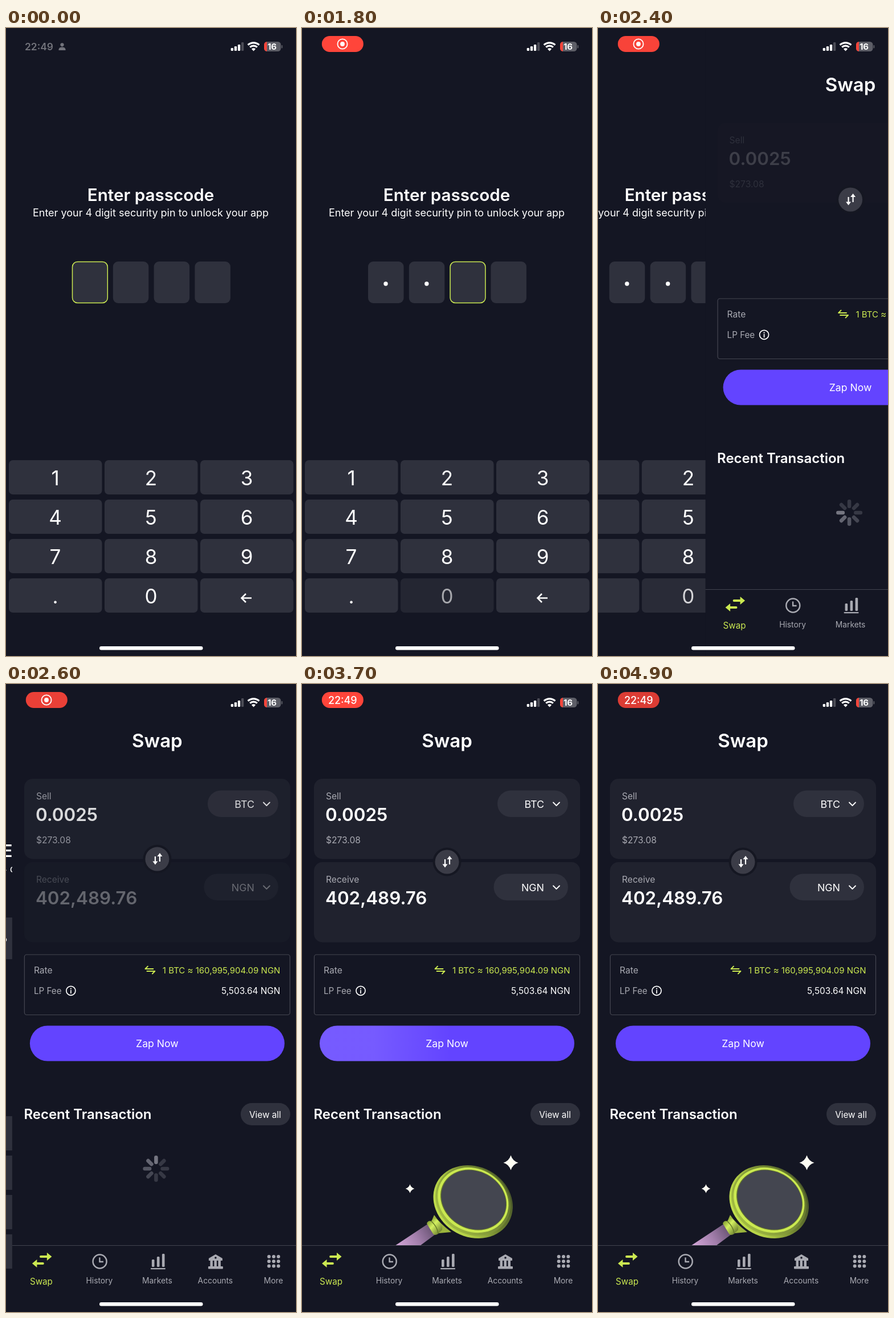
An HTML page with a canvas for the animation above (5000 ms loop, 509 by 1100 pixels).

```html
<!DOCTYPE html>
<html lang="en">
<head>
<meta charset="utf-8">
<title>Passcode to swap</title>
<style>
html, body { margin: 0; width: 509px; height: 1100px; overflow: hidden; background: #141623; }
canvas { display: block; }
</style>
</head>
<body>
<canvas id="stage" width="509" height="1100"></canvas>
<script>
const W = 509, H = 1100, LOOP = 5000, STEP = 100;
const BG = '#141623', KEY = '#2f313d', CARD = '#20222e', LIME = '#cbe951';
const GRAY = '#a9aab2', VIOLET = '#6344ff', WHITE = '#fff', RED = '#ff453a';
const PRESSES = [1200, 1500, 1800, 2200];
const c = document.getElementById('stage').getContext('2d');

const clamp = v => Math.max(0, Math.min(1, v));
const ramp = (t, from, to) => clamp((t - from) / (to - from));

function group(draw, x = 0, y = 0, alpha = 1) {
  c.save();
  c.translate(x, y);
  c.globalAlpha *= alpha;
  draw();
  c.restore();
}

function box(x, y, w, h, r, color) {
  c.beginPath();
  c.roundRect(x, y, w, h, r);
  c.fillStyle = color;
  c.fill();
}

function frame(x, y, w, h, r, color, width) {
  c.beginPath();
  c.roundRect(x, y, w, h, r);
  c.strokeStyle = color;
  c.lineWidth = width;
  c.stroke();
}

function disc(x, y, r, color) {
  c.beginPath();
  c.arc(x, y, r, 0, Math.PI * 2);
  c.fillStyle = color;
  c.fill();
}

function ring(x, y, r, color, width) {
  c.beginPath();
  c.arc(x, y, r, 0, Math.PI * 2);
  c.strokeStyle = color;
  c.lineWidth = width;
  c.stroke();
}

function oval(x, y, rx, ry, color) {
  c.beginPath();
  c.ellipse(x, y, rx, ry, 0.5, 0, Math.PI * 2);
  c.fillStyle = color;
  c.fill();
}

function stroke(path, color, width, cap = 'round') {
  c.strokeStyle = color;
  c.lineWidth = width;
  c.lineCap = cap;
  c.lineJoin = cap === 'butt' ? 'miter' : 'round';
  c.stroke(new Path2D(path));
}

function shape(path, color) {
  c.fillStyle = color;
  c.fill(new Path2D(path));
}

function text(str, x, y, size, color = WHITE, align = 'left', weight = 400) {
  c.font = `${weight} ${size}px Inter, sans-serif`;
  c.textAlign = align;
  c.fillStyle = color;
  c.fillText(str, x, y);
}

function linear(x0, y0, x1, y1, stops) {
  const g = c.createLinearGradient(x0, y0, x1, y1);
  stops.forEach(([at, color]) => g.addColorStop(at, color));
  return g;
}

// ---- Passcode page ----

function keyAlpha(t) {
  const last = PRESSES.filter(p => p <= t).pop();
  if (last === undefined) return 1;
  return [0.6, 0.45, 0.8][(t - last) / STEP] ?? 1;
}

function passcodePage(t) {
  box(0, 0, W, H, 0, BG);
  text('Enter passcode', 254, 303, 29.6, WHITE, 'center', 600);
  text('Enter your 4 digit security pin to unlock your app', 254, 330, 18, WHITE, 'center');

  const filled = PRESSES.filter(p => p < t).length;
  for (let i = 0; i < 4; i++) {
    const x = 116 + i * 71.8;
    box(x, 409, 62.5, 73, 9, KEY);
    if (i === filled) frame(x + 0.5, 409.5, 61.8, 72, 9, LIME, 1.5);
    if (i < filled) disc(x + 31, 448, 3.7, WHITE);
  }

  [...'123456789.0<'].forEach((label, i) => {
    const x = 5 + (i % 3) * 168, y = 757 + Math.floor(i / 3) * 69;
    group(() => {
      box(0, 0, 163.5, 60, 7, KEY);
      if (label === '<') stroke('M90 34.5H72.5M80 27L72.5 34.5L80 42', WHITE, 2.6, 'butt');
      else text(label, 81.5, 44, 35, WHITE, 'center');
    }, x, y, label === '0' ? keyAlpha(t) : 1);
  });
}

// ---- Swap page ----

function currency(label, x, y) {
  box(x, y, 467 - x, 46.5, 23.3, KEY);
  text(label, 425, y + 30, 17.8, WHITE, 'right');
  stroke(`M441 ${y + 21}l5.5 5.5l5.5 -5.5`, WHITE, 1.8);
}

function amountCard(y, label, amount, code, pillX) {
  box(21, y, 467, 140.5, 15, CARD);
  text(label, 42, y + 36, 15.6, GRAY);
  text(amount, 41, y + 74, 31.4, WHITE, 'left', 600);
  currency(code, pillX, y + 20.5);
}

function flipButton() {
  disc(254.5, 311.5, 25, '#151722');
  disc(254.5, 311.5, 21, '#3b3c47');
  stroke('M251 307V319M259 316V304', WHITE, 2.2, 'butt');
  shape('M246.5 315.5h9l-4.5 6zM254.5 307h9l-4.5 -6z', WHITE);
}

function rates() {
  frame(21.5, 474, 466, 105.5, 4, '#454651', 1.2);
  text('Rate', 38, 507, 15.6, GRAY);
  text('LP Fee', 38, 543, 15.2, GRAY);
  ring(103, 537.3, 8, WHITE, 1.7);
  disc(103, 533.7, 1.1, WHITE);
  stroke('M103 536.5V541.5', WHITE, 1.7);
  stroke('M247.5 499H233.5L238 494.5M236.5 503H250.5L246 507.5', LIME, 1.8);
  text('1 BTC ≈ 160,995,904.09 NGN', 470.5, 507, 15, LIME, 'right');
  text('5,503.64 NGN', 470.5, 543, 15.4, WHITE, 'right');
}

function zapButton(t) {
  const w = 447;
  box(31, 598.5, w, 62, 31, VIOLET);
  const sweep = ramp(t, 3443, 4443);
  if (sweep > 0 && sweep < 1) {
    const left = 31 - w + sweep * 2 * w;
    const clear = 'rgba(255,255,255,0)', glow = 'rgba(255,255,255,.12)';
    box(31, 598.5, w, 62, 31,
      linear(left, 0, left + w, 0, [[0, clear], [0.3, glow], [0.7, glow], [1, clear]]));
  }
  text('Zap Now', 254.5, 635.5, 17.6, WHITE, 'center');
}

function spinner(t) {
  const head = Math.floor((t - 2600) / 125);
  for (let i = 0; i < 8; i++) {
    const age = (((head - i) % 8) + 8) % 8;
    c.save();
    c.translate(252.5, 849);
    c.rotate(i * Math.PI / 4);
    const alpha = Math.max(0.16, 0.45 - age * 0.075);
    box(-3.3, -23, 6.6, 15, 3.3, `rgba(235,235,245,${alpha})`);
    c.restore();
  }
}

function sparkle(x, y, r) {
  const k = r * 0.24;
  shape(`M${x} ${y - r}Q${x + k} ${y - k} ${x + r} ${y}Q${x + k} ${y + k} ${x} ${y + r}` +
    `Q${x - k} ${y + k} ${x - r} ${y}Q${x - k} ${y - k} ${x} ${y - r}z`, '#fdfcf3');
}

function magnifier() {
  c.save();
  c.beginPath();
  c.rect(0, 780, W, 203);
  c.clip();
  shape('M222 945L163 984L207 984L234 964z',
    linear(170, 985, 230, 950, [[0, '#d0a4d5'], [0.5, '#a37fac'], [1, '#64506f']]));
  shape('M232 930Q241 944 262 960L240 962L226 944z', '#9cb53d');
  oval(300.2, 907, 72, 61.5,
    linear(240, 950, 366, 885, [[0, '#c5e44e'], [0.3, '#b0cc45'], [0.65, '#6c802f'], [1, '#48552a']]));
  oval(300.2, 905.5, 68, 58.5,
    linear(240, 945, 360, 870, [[0, '#a9c443'], [0.5, '#81973a'], [1, '#5c6d2b']]));
  oval(300.3, 904, 64.3, 54.8, LIME);
  oval(301, 903.6, 60, 50.8, '#66772f');
  oval(301.3, 903.6, 58.8, 49.8, '#444650');
  shape('M219 945Q221 939 227 941Q230 935 236 937Q248 948 246 956Q241 961 239 963Q233 967 230 963z',
    linear(222, 942, 244, 962, [[0, '#8da638'], [0.35, '#d3f060'], [1, '#62752b']]));
  stroke('M227 941Q237 950 239 962', '#647829', 1.5);
  sparkle(366.5, 838.5, 13);
  sparkle(189.5, 884, 7.8);
  c.restore();
}

function tabBar() {
  stroke('M0 983.5H509', '#42434e', 1.2, 'butt');
  stroke('M50 1003H64M41 1015H54', LIME, 3.8);
  shape('M61 996L69.5 1003L61 1010zM43.5 1008L35 1015L43.5 1022z', LIME);

  ring(153.7, 1011.5, 12, GRAY, 2.5);
  stroke('M153.5 1004.5V1012H160', GRAY, 2.4, 'butt');

  box(245, 1008, 4.6, 13, 1.5, GRAY);
  box(254, 1003, 4.6, 18, 1.5, GRAY);
  box(263, 998, 4.6, 23, 1.5, GRAY);
  box(243, 1023, 26, 2.3, 1, GRAY);

  shape('M357 999L369 1006V1010H345V1006z', GRAY);
  disc(357, 1005, 1.8, BG);
  [347.5, 354.5, 361.5].forEach(x => box(x, 1010, 4.5, 11, 0, GRAY));
  box(344, 1020, 26, 4.5, 1, GRAY);

  for (let i = 0; i < 9; i++) disc(450.7 + (i % 3) * 8.3, 1003 + Math.floor(i / 3) * 8.3, 3, GRAY);

  text('Swap', 51, 1052, 15.2, LIME, 'center');
  [['History', 153], ['Markets', 254.5], ['Accounts', 356.5], ['More', 458.5]]
    .forEach(([label, x]) => text(label, x, 1050, 13.8, GRAY, 'center'));
}

function swapPage(t) {
  box(0, 0, W, H, 0, BG);
  text('Swap', 254.5, 111, 33, WHITE, 'center', 600);
  group(() => {
    amountCard(166, 'Sell', '0.0025', 'BTC', 343);
    text('$273.08', 42, 278.5, 15.6, GRAY);
  }, 0, 0, ramp(t, 2350, 2650));
  group(() => amountCard(312, 'Receive', '402,489.76', 'NGN', 336.5), 0, 0, ramp(t, 2500, 2800));
  group(flipButton, 0, -11 * (1 - ramp(t, 2500, 2800)) ** 2);
  rates();
  zapButton(t);
  text('Recent Transaction', 20.5, 762, 24, WHITE, 'left', 600);
  box(401, 734, 87, 39, 19.5, KEY);
  text('View all', 444, 759.5, 15.3, WHITE, 'center');
  if (t < 3400) spinner(t);
  else magnifier();
  tabBar();
}

// ---- System chrome ----

function recordingPill(t) {
  const grow = ramp(t, 100, 400);
  if (!grow) return;
  const glow = clamp((0.5 + 0.5 * Math.cos(t / 1000 * Math.PI)) * 1.25);
  const mix = (a, b) => Math.round(a + (b - a) * glow);
  const w = 73 * (0.6 + 0.4 * grow), h = 28 * (0.6 + 0.4 * grow);
  group(() => {
    box(71.3 - w / 2, 28 - h / 2, w, h, h / 2, `rgb(${mix(218, 255)},${mix(60, 69)},${mix(52, 58)})`);
    group(() => {
      ring(71, 28, 8.6, WHITE, 1.8);
      disc(71, 28, 3.9, WHITE);
    }, 0, 0, 1 - ramp(t, 3100, 3400));
    group(() => text('22:49', 71.3, 34.5, 18, WHITE, 'center', 500), 0, 0, ramp(t, 3040, 3400));
  }, 0, 0, grow);
}

function statusBar(t) {
  group(() => {
    text('22:49', 33, 38.5, 17.4, WHITE, 'left', 600);
    disc(98.5, 29.3, 3.1, WHITE);
    shape('M92.5 39V37.5Q93 33.5 98.5 33.5Q104 33.5 104.5 37.5V39z', WHITE);
  }, 0, 0, 0.4 * (1 - ramp(t, 0, 200)));
  recordingPill(t);

  [5, 8, 11, 15].forEach((h, i) =>
    box(394.7 + i * 6.1, 40 - h, 4.3, h, 1.3, i < 3 ? WHITE : '#4b4c56'));

  c.save();
  c.beginPath();
  c.moveTo(434.5, 40.5);
  c.lineTo(418.5, 23);
  c.lineTo(450.5, 23);
  c.clip();
  disc(434.5, 40, 4.8, WHITE);
  ring(434.5, 40, 8.9, WHITE, 3.2);
  ring(434.5, 40, 14.2, WHITE, 3.2);
  c.restore();

  box(453, 24, 29.5, 17, 5.5, '#5d5e67');
  c.save();
  c.beginPath();
  c.rect(453, 24, 4.8, 17);
  c.clip();
  box(453, 24, 29.5, 17, 5.5, RED);
  c.restore();
  box(483.5, 30, 1.8, 5.5, 1, '#5d5e67');
  text('16', 467, 38, 15, WHITE, 'center', 700);
}

function render(t) {
  const x = Math.max(0, (t - 2282) / 1000 * 18.1);
  const push = t >= 2900 ? 1 : 1 - (1 + x) * Math.exp(-x);
  box(0, 0, W, H, 0, '#000');
  if (push < 1) group(() => passcodePage(t), -0.3 * W * push);
  if (push > 0.1) group(() => swapPage(t), W * (1 - push));
  statusBar(t);
  box(164, 1083, 181.5, 6.5, 3.25, WHITE);
}

function tick(now) {
  render(Math.floor(now % LOOP / STEP) * STEP);
  requestAnimationFrame(tick);
}
tick(0);
</script>
</body>
</html>
```
